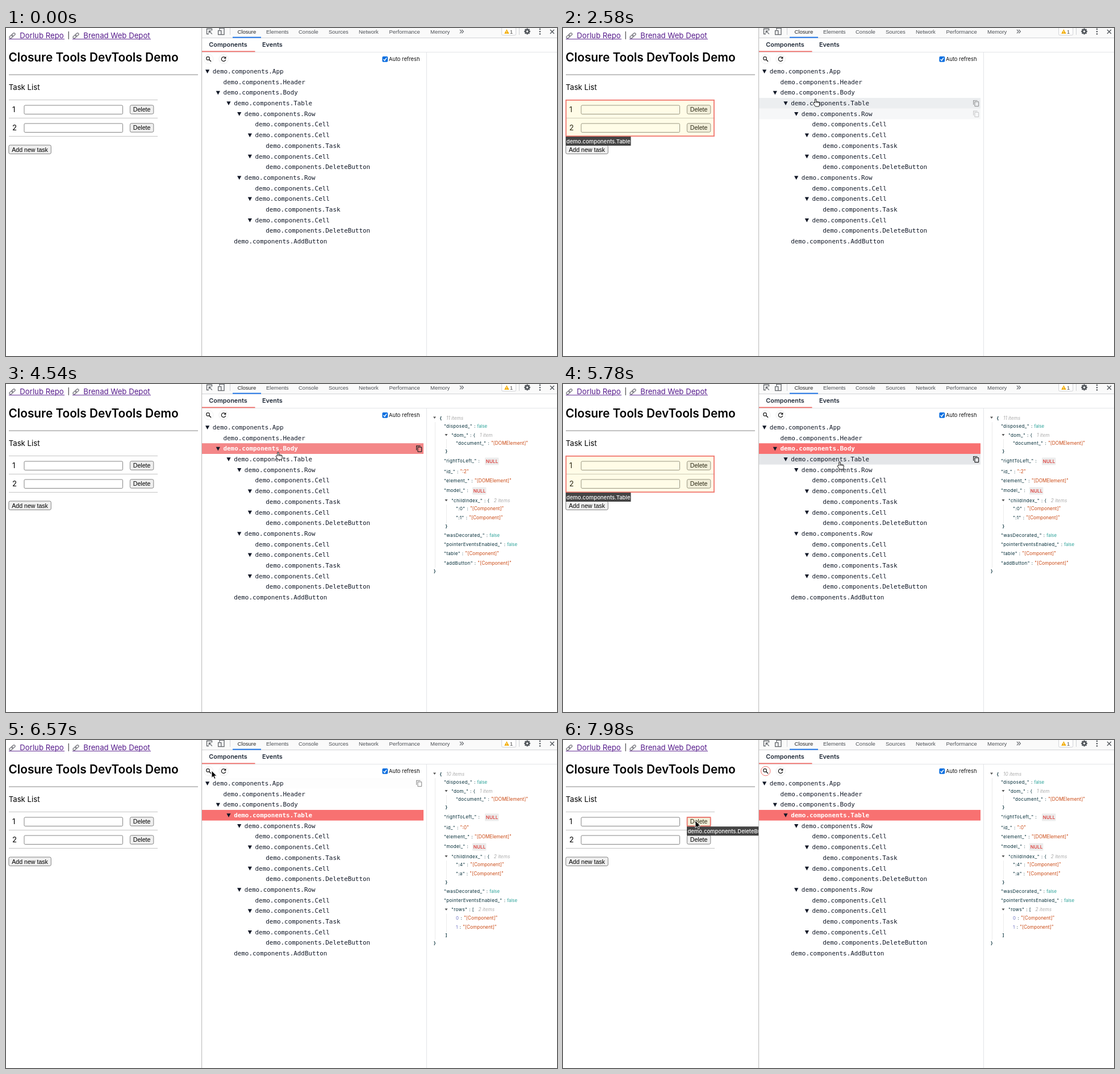
Write an HTML page that moves like this. It is 970 by 577 pixels and loops after 8 s.

```html
<!DOCTYPE html>
<html lang="en">
<head>
<meta charset="utf-8">
<title>Closure Tools DevTools Demo</title>
<style>
html, body { margin: 0; width: 100%; height: 100%; overflow: hidden; background: #fff; }
svg { display: block; }
text { font-family: Inter, sans-serif; white-space: pre; }
.page { font-size: 13.2px; }
.arial { font-family: "Liberation Sans", Arial, sans-serif; }
.tab { font-size: 9.5px; fill: #4d5156; }
.tree { font: 10.92px "DejaVu Sans Mono", monospace; fill: #111827; }
.tree.on { font-weight: 700; fill: #fff; }
.json { font-size: 8px; fill: #002b36; }
.key { letter-spacing: .4px; }
.string { font-size: 8.3px; fill: #cb4b16; }
.bool { font-size: 7.8px; fill: #2aa198; }
.count { font-size: 8.3px; font-style: italic; fill: #aaa; }
.line { fill: none; stroke: #222; stroke-width: 1.2; }
</style>
</head>
<body>
<svg id="stage" width="970" height="577" viewBox="0 0 970 577"></svg>
<script>
const stage = document.getElementById('stage');
const text = (x, y, s, attrs = '') => `<text x="${x}" y="${y}" ${attrs}>${s}</text>`;
const rect = (x, y, w, h, attrs) => `<rect x="${x}" y="${y}" width="${w}" height="${h}" ${attrs}/>`;
const path = (d, attrs = 'class="line"') => `<path d="${d}" ${attrs}/>`;
const $ = id => document.getElementById(id);

// ---- demo page ----
const button = (x, y, w, label) =>
  rect(x, y, w, 15.4, 'rx="2.4" fill="#efefef" stroke="#767676" stroke-width=".9"') +
  text(x + w / 2, y + 11.5, label, 'class="arial" font-size="10.6" text-anchor="middle"');

const link = (x, label, end) =>
  `<g fill="none" stroke="#85858c" stroke-width="1.5" transform="translate(${x + 6} 13.5) rotate(-42)">
   <rect x="-6" y="-2" width="6.6" height="4" rx="2"/><rect x="-.6" y="-2" width="6.6" height="4" rx="2"/></g>` +
  text(x + 19.3, 18, label, 'class="page" fill="#551a8b"') +
  path(`M${x} 19.5H${end}`, 'stroke="#551a8b" stroke-width=".9"');

const taskRow = (n, y) =>
  text(11, y + 4.5, n, 'class="page"') +
  rect(32, y - 7, 173.5, 15.5, 'rx="1.8" fill="#fff" stroke="#767676" stroke-width=".9"') +
  button(218.4, y - 7.2, 41.4, 'Delete');

const page = link(5, 'Dorlub Repo', 103) + text(108.2, 17.4, '|', 'font-size="11.5"') +
  link(117, 'Brenad Web Depot', 255) +
  text(4.5, 59.4, 'Closure Tools DevTools Demo', 'font-size="20.8" font-weight="600"') +
  path('M5 82.2H338', 'stroke="#858585"') +
  text(4.7, 109, 'Task List', 'class="page"') +
  path('M5 126.5H267M5 158.5H267M5 190.5H267', 'stroke="#c4c4c4"') +
  taskRow(1, 143) + taskRow(2, 175) + button(4.9, 206, 74.4, 'Add new task');

// ---- panel toolbars ----
const tabs = [['Elements', 458], ['Console', 515], ['Sources', 568], ['Network', 621],
  ['Performance', 674.5], ['Memory', 747]];
const gear = Array.from({ length: 8 }, (_, i) =>
  `<rect x="-1.2" y="-5.4" width="2.4" height="3" transform="rotate(${i * 45})"/>`).join('');

const toolbar = rect(345, 0, 625, 17, 'fill="#fafafa"') +
  path('M345 17.4H970M394.5 0V12M903.5 0V12', 'stroke="#d0d2d5"') +
  path('M345 42.5H970M740.5 43V577', 'stroke="#e2e4e8"') +
  path('M344.6 0V577', 'stroke="#b8b8b8"') +
  path('M357 10.5H353.5V1.5H362.5V4.5M357.5 5.2L362.8 10.6M357.4 9V5.1H361.4', 'fill="none" stroke="#5f6368" stroke-width="1.3"') +
  path('M376 3.5V.4H384V11.6H379M373.6 4.6H378.8V11.7H373.6Z', 'fill="none" stroke="#5f6368" stroke-width="1.3"') +
  text(407.5, 9.6, 'Closure', 'class="arial tab" style="fill:#222"') +
  tabs.map(([s, x]) => text(x, 9.6, s, 'class="arial tab"')).join('') +
  rect(399, 15.6, 50, 1.9, 'fill="#1a73e8"') +
  path('M799 3L802 6.2L799 9.4M802.4 3L805.4 6.2L802.4 9.4', 'fill="none" stroke="#5f6368" stroke-width="1.1"') +
  rect(872.7, -3, 25, 15.6, 'rx="2" fill="#fff" stroke="#d0d2d5"') +
  path('M881.5 2.2L885.8 10H877.2Z', 'fill="#f2ab00"') +
  path('M881.5 5V7.4M881.5 8.2V9.1', 'stroke="#fff" stroke-width=".9"') +
  text(887, 9.7, '1', 'class="arial" font-size="9.6" fill="#444"') +
  `<g transform="translate(917.6 6)" fill="#50555a">${gear}
   <circle r="2.9" fill="none" stroke="#50555a" stroke-width="2.3"/></g>` +
  [2, 6.2, 10.4].map(y => `<circle cx="940" cy="${y}" r="1.25" fill="#50555a"/>`).join('') +
  path('M958 3L965 10M965 3L958 10', 'stroke="#50555a" stroke-width="1.4"') +
  text(357.3, 32.8, 'Components', 'font-size="10.9" font-weight="600" fill="#1f2937"') +
  text(451, 32.8, 'Events', 'font-size="10.9" font-weight="600" fill="#1f2937"') +
  rect(345, 40.4, 93.5, 1.8, 'fill="#f0706a"') +
  '<circle id="ring" cx="356.7" cy="54.6" r="8.2" fill="#fff"/><circle cx="383" cy="54.6" r="8.2" fill="#fff" stroke="#efefef"/>' +
  '<circle cx="355.5" cy="53.4" r="2.8" class="line"/>' + path('M357.6 55.5L361 59', 'stroke="#222" stroke-width="1.6"') +
  path('M386.3 52.6A3.8 3.8 0 1 0 386.8 55.6', 'fill="none" stroke="#222" stroke-width="1.3"') +
  path('M387.4 50V54H383.4Z', 'fill="#222"') +
  rect(662.4, 50, 9.8, 9.8, 'rx="1.8" fill="#0b6fe0"') +
  path('M664.6 55L666.6 57.2L670 52.4', 'fill="none" stroke="#fff" stroke-width="1.5"') +
  text(674, 58, 'Auto refresh', 'font-size="9.3" fill="#111"');

// ---- component tree: name, depth, open arrow ----
const taskRows = [['Row', 3, 1], ['Cell', 4], ['Cell', 4, 1], ['Task', 5], ['Cell', 4, 1], ['DeleteButton', 5]];
const rows = [['App', 0, 1], ['Header', 1], ['Body', 1, 1], ['Table', 2, 1], ...taskRows, ...taskRows, ['AddButton', 2]];
const pitch = 18.69, rowTop = 66.9;

const tree = rows.map(([name, depth, open], i) => {
  const top = rowTop + i * pitch, mid = top + pitch / 2, x = 363.8 + depth * pitch;
  return rect(345, top, 390, pitch, `id="hover${i}" fill="#e4e6e9"`) +
    rect(345, top, 390, pitch, `id="pick${i}" fill="#f87171"`) +
    (open ? path(`M${x - 12.8} ${mid - 3}h7.2l-3.6 6.8z`, 'fill="#111827"') : '') +
    text(x, mid + 3.8, 'demo.components.' + name, `id="name${i}"`) +
    `<g id="copy${i}" class="line" transform="translate(722 ${mid - 5.4})">
     <path d="M.6 8.2V.6H7.6"/><rect x="2.9" y="2.8" width="6.7" height="8" rx=".6"/></g>`;
}).join('');

// ---- inspector ----
const caret = (x, y) => path(`M${x - 2.5} ${y - 2}h5l-2.5 3.4z`, 'fill="#555"');
const kv = (x, y, key, val, type = 'json') => text(x, y + 2.9,
  `<tspan class="key">${key}</tspan><tspan dx="3">:</tspan><tspan dx="3.2" class="${type}">${val}</tspan>`, 'class="json"');
const str = (y, key, val, x = 771) => kv(x, y, `"${key}"`, `"${val}"`, 'string');
const bool = (y, key) => kv(771, y, `"${key}"`, 'false', 'bool');
const nil = (y, key, x) => kv(771, y, `"${key}"`, '') + rect(x, y - 5.4, 24.4, 13, 'rx="1" fill="#ececec"') +
  text(x + 1.8, y + 4.1, 'NULL', 'font-size="8.2" font-weight="500" fill="#dc322f"');
const brace = (x, y, s) => text(x, y + 2.9, s, 'class="json" font-weight="600"');
const group = (y, key, n, end, open = '{', close = '}') => caret(775, y) +
  kv(784, y, `"${key}"`, `${open}<tspan dx="8" class="count">${n}</tspan>`) +
  path(`M775.5 ${y + 7}V${end - 5}`, 'stroke="#ebebeb"') + brace(773.6, end, close);

const inspector = (id, count, self, kids, end, tail) => `<g id="${id}">` +
  caret(754.5, 59.6) + brace(763.5, 60, '{') + text(775, 63, count + ' items', 'class="count"') +
  path(`M755.5 67V${end - 6}`, 'stroke="#ebebeb"') +
  bool(74, 'disposed_') + group(90, 'dom_', '1 item', 118.5) + str(104.5, 'document_', '[DOMElement]', 792) +
  nil(135, 'rightToLeft_', 843) + str(153.7, 'id_', self) + str(170, 'element_', '[DOMElement]') +
  nil(186.8, 'model_', 821) + group(205, 'childIndex_', '2 items', 250) +
  kids.map((k, i) => str(219.2 + i * 16.3, k, '[Component]', 792)).join('') +
  bool(266, 'wasDecorated_') + bool(282.2, 'pointerEventsEnabled_') + tail +
  brace(753, end, '}') + '</g>';

const index = (y, n) => kv(792, y, `<tspan fill="#6c71c4">${n}</tspan>`, '"[Component]"', 'string');
const bodyView = inspector('bodyView', 11, ':2', [':0', ':1'], 329,
  str(298.5, 'table', '[Component]') + str(314.8, 'addButton', '[Component]'));
const tableView = inspector('tableView', 10, ':0', [':4', ':a'], 357,
  group(298.5, 'rows', '2 items', 343, '[', ']') + index(312.8, 0) + index(329, 1));

// ---- overlay and pointer ----
const overlay = `<clipPath id="pageClip"><rect width="344.2" height="577"/></clipPath>
  <g id="overlay" clip-path="url(#pageClip)">
  <rect id="box" fill="#ffec70" fill-opacity=".17" stroke="#f07068" stroke-width="1.7"/>
  <rect id="tagBack" height="16" fill="#444"/>
  <text id="tag" font-size="9.5" font-weight="500" fill="#fff"></text></g>`;
const pointer = `<g id="pointer" stroke-linejoin="round">
  <path id="arrow" d="M0 0V12.6L2.9 9.9L4.9 14.4L7 13.5L5 9.2H8.9Z" fill="#000" stroke="#fff" stroke-width=".9"/>
  <path id="hand" d="M-1.2 6.6V1A1.2 1.2 0 0 1 1.2 1V4.6Q2.4 3.8 3.4 4.8Q4.6 4.2 5.4 5.2Q7 4.9 7.2 6.4V9Q7.2 11 6 13H-.2Q-2.2 10-3.8 7.8Q-3.9 6-2.4 6.2ZM1.2 4.6V7M3.4 4.8V7M5.4 5.2V7.2" fill="#fff" stroke="#000" stroke-width=".9"/></g>`;

stage.innerHTML = rect(0, 0, 970, 577, 'fill="#fff"') + page + toolbar + tree + bodyView + tableView + overlay + pointer;

// ---- timing ----
const moves = [[530, 612, 5], [619, 612, 5], [620, 562, 40], [790, 562, 40], [940, 455, 130], [1100, 262, 235],
  [1200, 219, 260], [1340, 258, 271], [1940, 258, 271], [2080, 276, 258], [2320, 350, 205], [2520, 436, 140],
  [2720, 464, 91], [2780, 466, 84], [2980, 467, 75], [3550, 467, 75], [3660, 471, 92], [4040, 476, 112],
  [4400, 476, 112], [4540, 479, 120], [5040, 479, 120], [5250, 487, 137], [5960, 487, 137], [6180, 462, 112],
  [6400, 395, 74], [6560, 362, 54], [6820, 362, 54], [6830, 360, 54], [7370, 360, 54], [7480, 339, 68],
  [7700, 280, 112], [7960, 233, 142]];
const shapes = [[0, 'arrow'], [2340, 'hand'], [6460, 'arrow'], [6655, 'hand'], [7380, 'arrow']];
const hovers = [[0, -1], [2340, 6], [2430, 4], [2520, 3], [2590, 2], [2660, 1], [2780, 0], [3750, 1], [3930, 2],
  [5100, 3], [6110, 2], [6230, 1], [6340, 0], [6490, -1]];
const picks = [[0, -1], [4420, 2], [5870, 3]];
const boxes = {
  App: [5.3, 38.8, 332, 182.4], Header: [5.3, 38.8, 332, 43.6], Body: [5.3, 96, 332, 125.2],
  Table: [5.3, 126.8, 260.6, 63.4], Row: [5.3, 126.8, 260.6, 31.6], Cell: [26, 126.8, 186, 31.6],
  DeleteButton: [218.6, 136, 41, 15.4]
};
const outlines = [...hovers.map(([t, i]) => [t, rows[i]?.[0]]), [4420], [5870], [7430, 'Header'], [7570, 'App'],
  [7670, 'Body'], [7790, 'Row'], [7880, 'DeleteButton']].sort((a, b) => a[0] - b[0]);

const clamp = v => Math.max(0, Math.min(1, v));
const at = (list, t) => list.findLast(e => e[0] <= t)?.[1];
const show = (id, on) => $(id).style.display = on ? '' : 'none';

// Opacity of item i as it fades in and out while the list switches between items.
function level(list, i, t, fade) {
  let v = 0;
  list.forEach(([start, item], k) => {
    if (start > t) return;
    const end = Math.min(t, list[k + 1]?.[0] ?? t);
    v = clamp(v + (item === i ? 1 : -1) * (end - start) / fade);
  });
  return v;
}

function place(t) {
  const k = moves.findLastIndex(m => m[0] <= t);
  show('pointer', k >= 0);
  if (k < 0) return;
  const a = moves[k], b = moves[k + 1] || a;
  const f = b === a ? 0 : (t - a[0]) / (b[0] - a[0]);
  $('pointer').setAttribute('transform', `translate(${a[1] + (b[1] - a[1]) * f} ${a[2] + (b[2] - a[2]) * f})`);
  const shape = at(shapes, t);
  show('arrow', shape === 'arrow');
  show('hand', shape === 'hand');
}

function outline(name) {
  show('overlay', name);
  if (!name) return;
  const [x, y, w, h] = boxes[name], bottom = y + h + .8;
  const set = (id, attrs) => Object.entries(attrs).forEach(([k, v]) => $(id).setAttribute(k, v));
  set('box', { x, y, width: w, height: h });
  $('tag').textContent = 'demo.components.' + name;
  set('tag', { x: x + .8, y: bottom + 11.6 });
  set('tagBack', { x: x - .6, y: bottom, width: $('tag').getComputedTextLength() + 2.4 });
}

function draw(t) {
  const picked = at(picks, t);
  rows.forEach((_, i) => {
    $('hover' + i).style.opacity = level(hovers, i, t, 90);
    $('pick' + i).style.opacity = level(picks, i, t, 150);
    $('copy' + i).style.opacity = level(hovers, i, t, 150);
    $('name' + i).setAttribute('class', i === picked ? 'tree on' : 'tree');
  });
  show('bodyView', picked === 2);
  show('tableView', picked === 3);
  $('ring').setAttribute('stroke', t >= 7190 ? '#f0706a' : '#efefef');
  outline(at(outlines, t));
  place(t);
}

const began = performance.now();
function tick() {
  draw((performance.now() - began) % 8000);
  requestAnimationFrame(tick);
}
tick();
</script>
</body>
</html>
```
